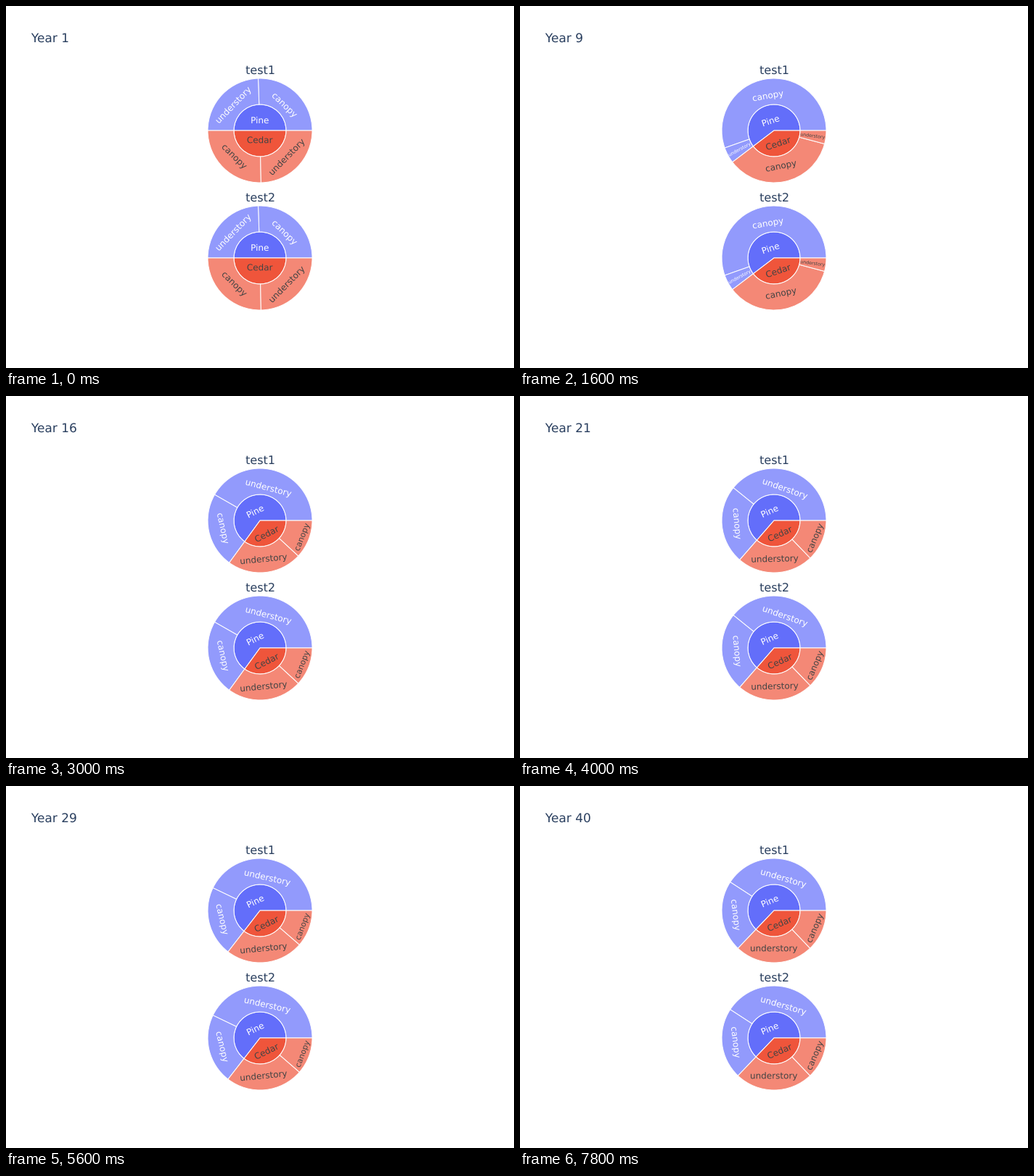
A matplotlib script for the animation above (8000 ms loop, 700x500 px).

```python
import matplotlib.pyplot as plt
import numpy as np
from matplotlib.animation import FuncAnimation
from matplotlib.patches import PathPatch, Wedge
from matplotlib.textpath import TextPath
from matplotlib.transforms import Affine2D

W, H, DPI = 700, 500, 100
YEARS, STEP = 40, 200
R = 72
INK = "#2a3f5f"
PLOTS = [("test1", 350, 328), ("test2", 350, 152)]

# Forest state at key years: angle taken by pine, canopy share per species
KEY_YEARS = [1, 9, 16, 21, 29, 35, 40]
PINE_ANGLE = [180, 217.3, 234, 229, 232.3, 229.2, 226.4]
PINE_CANOPY = [0.511, 0.918, 0.358, 0.384, 0.336, 0.319, 0.351]
CEDAR_CANOPY = [0.506, 0.896, 0.340, 0.352, 0.321, 0.3135, 0.347]

# name: inner colour, outer colour, label colour
SPECIES = {
    "Pine": ("#636efa", "#929afc", "white"),
    "Cedar": ("#ef553b", "#f48876", "#444444"),
}

fig = plt.figure(figsize=(W / DPI, H / DPI), dpi=DPI, facecolor="white")
ax = fig.add_axes([0, 0, 1, 1])


def glyphs(text, size):
    return TextPath((0, 0), text, size=size, prop={"family": "DejaVu Sans"})


def put_text(path, color, move):
    ax.add_patch(PathPatch(path, fc=color, lw=0, transform=move + ax.transData))


def fit_box(a, half, r, ring):
    """Largest half side of a box of aspect a in a sector, and its radius."""
    q = a + 1 / (2 * np.tan(half))
    s = min(1 / (np.sqrt(q * q + 0.5) + q),
            ring / (np.sqrt(a * a + ring / 2) + a))
    return s * r, np.cos(s) - a * s


def place_label(w, h, r, ring, half, mid):
    """Best of upright, radial and tangential: (scale, radius, rotation)."""
    inscribed = min(1 / (1 + 1 / np.sin(half)), ring / 2)
    options = [(2 * inscribed * r / np.hypot(w, h), 1 - inscribed, 0)]
    for along, across, turn in ((w, h, 0), (h, w, 90)):
        s, radius = fit_box(along / across, half, r - 4, ring)
        rot = (mid + turn + 90) % 180 - 90
        options.append((2 * s / across, radius, rot))
    scale, radius, rot = max(options, key=lambda o: o[0])
    return min(scale, 1), radius * r, rot


def sector(cx, cy, r, ring, start, stop, fill, label, color):
    ax.add_patch(Wedge((cx, cy), r, start, stop, width=r * ring, fc=fill,
                       ec="white", lw=72 / DPI, joinstyle="miter"))
    path = glyphs(label, 12)
    box = path.get_extents()
    mid = (start + stop) / 2
    half = np.radians(stop - start) / 2
    scale, radius, rot = place_label(box.width + 1, 15, r, ring, half, mid)
    a = np.radians(mid)
    move = (Affine2D().translate(-(box.x0 + box.x1) / 2, -4.5)
            .scale(scale).rotate_deg(rot)
            .translate(cx + radius * np.cos(a), cy + radius * np.sin(a)))
    put_text(path, color, move)


def sunburst(cx, cy, year):
    def at(values):
        return np.interp(year, KEY_YEARS, values)

    split = at(PINE_ANGLE)
    spans = {"Pine": (0, split, at(PINE_CANOPY)),
             "Cedar": (split, 360, at(CEDAR_CANOPY))}
    for name, (start, stop, canopy) in spans.items():
        inner, outer, color = SPECIES[name]
        sector(cx, cy, R / 2, 1, start, stop, inner, name, color)
        parts = sorted([(canopy, "canopy"), (1 - canopy, "understory")],
                       reverse=True)
        a = start
        for share, label in parts:
            b = a + share * (stop - start)
            sector(cx, cy, R, 0.5, a, b, outer, label, color)
            a = b


def draw(i):
    ax.clear()
    ax.set(xlim=(0, W), ylim=(0, H))
    ax.axis("off")
    put_text(glyphs(f"Year {i + 1}", 17), INK, Affine2D().translate(34.8, 450))
    for title, cx, cy in PLOTS:
        path = glyphs(title, 16)
        box = path.get_extents()
        put_text(path, INK,
                 Affine2D().translate(cx - (box.x0 + box.x1) / 2, cy + R + 6))
        sunburst(cx, cy, i + 1)
    return ax.patches


anim = FuncAnimation(fig, draw, frames=YEARS, interval=STEP,
                     init_func=lambda: draw(0), repeat=True, repeat_delay=0)
plt.show()
```
